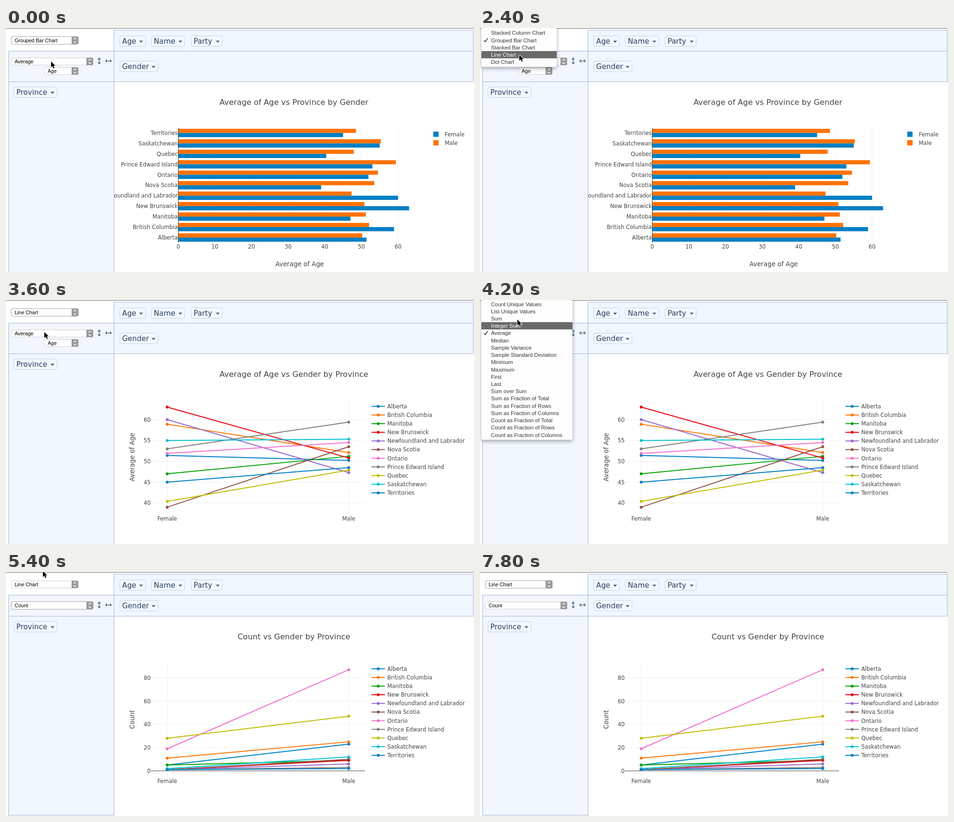
Write an HTML page with a canvas that moves like this. It is 977 px wide and 511 px high and loops after 8 s.

```html
<!DOCTYPE html>
<html lang="en">
<head>
<meta charset="utf-8">
<title>Pivot table charts</title>
<style>
html, body { margin: 0; width: 100%; height: 100%; overflow: hidden; background: #fff; }
canvas { display: block; }
</style>
</head>
<body>
<canvas id="stage" width="977" height="511"></canvas>
<script>
const ctx = document.getElementById('stage').getContext('2d');
const STEP = 600, LOOP = 8000;
const VERDANA = 'Verdana, "DejaVu Sans", sans-serif';
const HELVETICA = 'Helvetica, "Liberation Sans", Arial, sans-serif';
const INK = '#444', GRID = '#eee', NAVY = '#2a3f5f', EDGE = '#a2b4d6', PANEL = '#f1f6ff';
const BLUE = '#007fc4', ORANGE = '#ff7200';

// name, colour, average age (female, male), count (female, male)
const provinces = [
  ['Alberta', BLUE, 51.4, 50.2, 5, 23],
  ['British Columbia', ORANGE, 58.9, 52.1, 11, 25],
  ['Manitoba', '#00a300', 47, 51.2, 5, 9],
  ['New Brunswick', '#e8000b', 63, 50.8, 1, 9],
  ['Newfoundland and Labrador', '#9a68cc', 60, 47.3, 1, 6],
  ['Nova Scotia', '#925146', 39, 53.5, 1, 10],
  ['Ontario', '#f272cb', 51.9, 54.5, 19, 87],
  ['Prince Edward Island', '#7f7f7f', 53, 59.4, 1, 3],
  ['Quebec', '#c0bd00', 40.4, 47.9, 28, 47],
  ['Saskatchewan', '#00c1d4', 55, 55.3, 2, 12],
  ['Territories', BLUE, 45, 48.5, 1, 2]
];
const chartItems = ['Stacked Column Chart', 'Grouped Bar Chart', 'Stacked Bar Chart', 'Line Chart', 'Dot Chart'];
const aggregators = ['Count', 'Count Unique Values', 'List Unique Values', 'Sum', 'Integer Sum', 'Average',
  'Median', 'Sample Variance', 'Sample Standard Deviation', 'Minimum', 'Maximum', 'First', 'Last', 'Sum over Sum',
  ...['Sum', 'Count'].flatMap(f => ['Total', 'Rows', 'Columns'].map(s => `${f} as Fraction of ${s}`))];

// Each step: cursor position, open menu, highlighted item
const steps = [
  [94, 70], [82, 28], [84, 28],
  [82, 26, 'bar', 'Grouped Bar Chart'], [82, 56, 'bar', 'Line Chart'],
  [82, 56], [80, 67],
  [78, 41, 'aggregator', 'Integer Sum'], [77, -5, 'aggregator', 'Count'],
  [77, -2], [80, 23],
  [81, 23, 'line', 'Line Chart'], [83, 38, 'line', 'Dot Chart'],
  []
];
const menus = {
  bar: { items: chartItems, checked: 'Grouped Bar Chart', top: 10.2, right: 160 },
  aggregator: { items: aggregators, checked: 'Average', top: -6.9, right: 193 },
  line: { items: chartItems.slice(2), checked: 'Line Chart', top: 10.2, right: 160 }
};

function text(str, x, y, size, color = INK, align = 'left', family = VERDANA) {
  ctx.font = `${size}px ${family}`;
  ctx.fillStyle = color;
  ctx.textAlign = align;
  ctx.fillText(str, x, y + size * 0.36);
}

function rect(x, y, w, h, color) {
  ctx.fillStyle = color;
  ctx.fillRect(x, y, w, h);
}

function path(points, color, width) {
  ctx.beginPath();
  points.forEach(([x, y]) => ctx.lineTo(x, y));
  if (width) {
    ctx.strokeStyle = color;
    ctx.lineWidth = width;
    ctx.stroke();
  } else {
    ctx.fillStyle = color;
    ctx.fill();
  }
}

function rounded(x, y, w, h, radius, fill, stroke) {
  ctx.beginPath();
  ctx.roundRect(x, y, w, h, radius);
  ctx.fillStyle = fill;
  ctx.fill();
  if (stroke) {
    ctx.strokeStyle = stroke;
    ctx.lineWidth = 1;
    ctx.stroke();
  }
}

function dot(x, y, color) {
  ctx.beginPath();
  ctx.arc(x, y, 3, 0, 7);
  ctx.fillStyle = color;
  ctx.fill();
}

function cell(x, y, w, h) {
  rect(x, y, w, h, PANEL);
  ctx.strokeStyle = EDGE;
  ctx.lineWidth = 1;
  ctx.strokeRect(x + 0.5, y + 0.5, w, h);
}

function chip(label, x, y, w) {
  rounded(x + 0.5, y + 0.5, w - 1, 22, 4, '#f3f8ff', '#c3d3e6');
  text(label, x + 5.5, y + 12, 15.2, NAVY);
  const tip = x + w - 10;
  path([[tip - 4.2, y + 10.5], [tip + 4.2, y + 10.5], [tip, y + 15]], '#506784');
}

function select(label, x, y, right, focused) {
  const grow = focused ? 0.5 : 0;
  rounded(x + 0.5 - grow, y + 0.5 - grow, right - x - 1 + 2 * grow, 15 + 2 * grow, 3, '#fff', focused ? '#a0a0a0' : '#d0d0d0');
  rounded(right - 14, y, 14, 16, [0, 3, 3, 0], '#999');
  const mid = right - 7;
  for (const s of [-1, 1]) {
    path([[mid - 2.7, y + 8 + s * 2], [mid, y + 8 + s * 5], [mid + 2.7, y + 8 + s * 2]], '#fff', 1.2);
  }
  text(label, x + 7, y + 8.5, 10.6, '#000', 'left', HELVETICA);
}

function sortArrows() {
  const color = '#3d5478';
  path([[194.5, 63], [194.5, 75]], color, 1.2);
  path([[208, 69], [220, 69]], color, 1.2);
  for (const s of [-1, 1]) {
    path([[191.8, 69 + s * 3], [194.5, 69 + s * 6], [197.2, 69 + s * 3]], color, 1.2);
    path([[214 + s * 3, 66.3], [214 + s * 6, 69], [214 + s * 3, 71.7]], color, 1.2);
  }
}

function barChart() {
  const x0 = 359.5, unit = 7.65, pitch = 21.9, bar = 8.75;
  text('Average of Age vs Province by Gender', 601, 155.5, 16.2, INK, 'center');
  for (let v = 0; v <= 60; v += 10) {
    const x = x0 + v * unit;
    path([[x, 209], [x, 449]], GRID, 1);
    text(v, x, 458, 11.4, INK, 'center');
  }
  ctx.save();
  ctx.beginPath();
  ctx.rect(226, 200, 751, 260);
  ctx.clip();
  provinces.forEach(([name, , female, male], i) => {
    const y = 219.8 + (10 - i) * pitch;
    rect(x0, y - bar, male * unit, bar, ORANGE);
    rect(x0, y, female * unit, bar, BLUE);
    text(name, 358.5, y, 11.4, INK, 'right');
  });
  ctx.restore();
  path([[x0, 209], [x0, 449]], INK, 1);
  [['Female', BLUE], ['Male', ORANGE]].forEach(([name, color], i) => {
    rect(892, 217 + i * 18, 11, 11, color);
    text(name, 916, 223 + i * 18, 11.4);
  });
  text('Average of Age', 613, 494, 13.3, INK, 'center');
}

function lineChart({ title, axis, ticks, zeroY, unit, column }) {
  const left = 336.5, right = 715.5, yOf = v => zeroY - v * unit;
  text(title, 601, 155.5, 16.2, INK, 'center');
  for (const [x, label] of [[left, 'Female'], [right, 'Male']]) {
    path([[x, 209], [x, 449]], GRID, 1);
    text(label, x, 458, 11.4, INK, 'center');
  }
  for (const v of ticks) {
    path([[303, yOf(v)], [749, yOf(v)]], v ? GRID : INK, 1);
    text(v, 302, yOf(v), 11.4, INK, 'right');
  }
  ctx.save();
  ctx.translate(263, 329);
  ctx.rotate(-Math.PI / 2);
  text(axis, 0, 0, 13.3, INK, 'center');
  ctx.restore();
  provinces.forEach((row, i) => {
    const [name, color] = row, y = 222.7 + i * 18.12;
    const a = [left, yOf(row[column])], b = [right, yOf(row[column + 1])];
    path([a, b], color, 2);
    dot(...a, color);
    dot(...b, color);
    path([[763, y], [791, y]], color, 2);
    dot(777, y, color);
    text(name, 796, y, 11.4);
  });
}

const averageChart = {
  title: 'Average of Age vs Gender by Province', axis: 'Average of Age',
  ticks: [40, 45, 50, 55, 60], zeroY: 774.5, unit: 8.733, column: 2
};
const countChart = {
  title: 'Count vs Gender by Province', axis: 'Count',
  ticks: [0, 20, 40, 60, 80], zeroY: 436.5, unit: 2.435, column: 4
};

function menu({ items, checked, top, right }, highlighted) {
  const pitch = 15.22, bottom = top + (items.length - 1) * pitch + 10.5;
  ctx.save();
  ctx.shadowColor = 'rgba(0,0,0,.35)';
  ctx.shadowBlur = 9;
  ctx.shadowOffsetY = 3;
  rounded(3, -20, right - 3, bottom + 20, 4, '#fdfdfd');
  ctx.restore();
  items.forEach((item, i) => {
    const y = top + i * pitch, on = item === highlighted;
    const color = on ? '#fff' : '#333';
    if (on) rect(3, y - 7.6, right - 3, pitch, '#696969');
    if (item === checked) path([[8.5, y + 0.5], [11, y + 3.5], [16, y - 4]], color, 1.6);
    text(item, 23, y + 0.2, 11.25, color, 'left', HELVETICA);
  });
}

function cursor(x, y) {
  const outline = [[0, 0], [0, 12.5], [2.9, 9.8], [5.1, 14.4], [7.2, 13.4], [5.1, 9], [9, 9], [0, 0]]
    .map(([dx, dy]) => [x + dx, y + dy]);
  path(outline, '#fff', 2);
  path(outline, '#000');
}

function draw(now) {
  const step = Math.floor(now % LOOP / STEP);
  const [x, y, open, highlighted] = steps[step];
  const bars = step < 5, counting = step > 8;
  const lift = counting ? 20 : 0;
  const aggregatorFocused = step > 6 && step < 11;

  rect(0, 0, 977, 511, '#fff');
  cell(225, 4, 750, 44);
  cell(225, 48, 750, 64 - lift);
  cell(5, 48, 220, 64 - lift);
  cell(5, 112 - lift, 220, counting ? 417 : 420);
  rect(0, 0, 977, 1, '#666');

  chip('Age', 237, 16, 55);
  chip('Name', 303, 16, 71);
  chip('Party', 386, 16, 66);
  chip('Gender', 237, counting ? 59 : 69, 81);
  chip('Province', 16, 123 - lift, 91);
  select(bars ? 'Grouped Bar Chart' : 'Line Chart', 11, 18, 151, !aggregatorFocused);
  select(counting ? 'Count' : 'Average', 11, 62, 182, aggregatorFocused);
  if (!counting) select('Age', 80, 82, 151);
  sortArrows();

  ctx.save();
  ctx.translate(0, -lift);
  if (bars) barChart();
  else lineChart(counting ? countChart : averageChart);
  ctx.restore();

  if (open) menu(menus[open], highlighted);
  if (x) cursor(x, y);
}

function frame() {
  draw(performance.now());
  requestAnimationFrame(frame);
}
frame();
</script>
</body>
</html>
```
